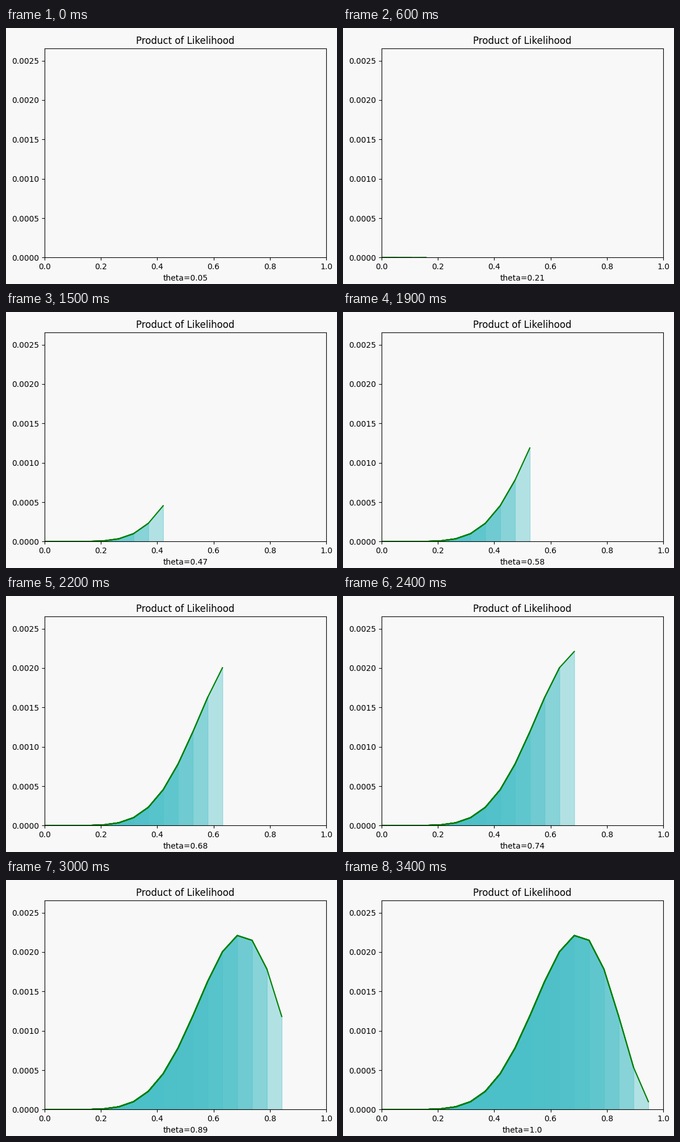
Animation, 583 px wide and 451 px high, one loop 4000 ms. Source, as a matplotlib script:

```python
import matplotlib.pyplot as plt
import numpy as np
from matplotlib.animation import FuncAnimation

W, H, DPI = 583, 451, 100
FRAMES, INTERVAL = 40, 100
BACK, FILL = "#f8f8f8", "#4bc0c8"

theta = np.linspace(0, 1, 20)
like = theta**7 * (1 - theta)**3

fig = plt.figure(figsize=(W / DPI, H / DPI), dpi=DPI, facecolor=BACK)
ax = fig.add_axes([68 / W, 46.6 / H, 496 / W, 368 / H], facecolor=BACK)
ax.set_xlim(0, 1)
ax.set_ylim(0, like.max() * 1.2)
ax.set_title("Product of Likelihood")

# One translucent area and one line per partial curve; they pile up over time.
layers = []
for n in range(2, len(theta)):
    area = ax.fill_between(theta[:n], like[:n], color=FILL, alpha=0.4)
    line, = ax.plot(theta[:n], like[:n], color="green")
    layers.append((n, area, line))


def points_shown(frame):
    # Two ticks per step, with one short step at ticks 10 and 21.
    return min(1 + (frame + min(frame // 11, 2)) // 2, len(theta) - 1)


def update(frame):
    count = points_shown(frame)
    for n, area, line in layers:
        area.set_visible(n <= count)
        line.set_visible(n <= count)
    ax.set_xlabel(f"theta={round(float(theta[count]), 2)}")
    return []


anim = FuncAnimation(fig, update, frames=FRAMES, interval=INTERVAL,
                     init_func=lambda: update(0), repeat=True, repeat_delay=0)
plt.show()
```
